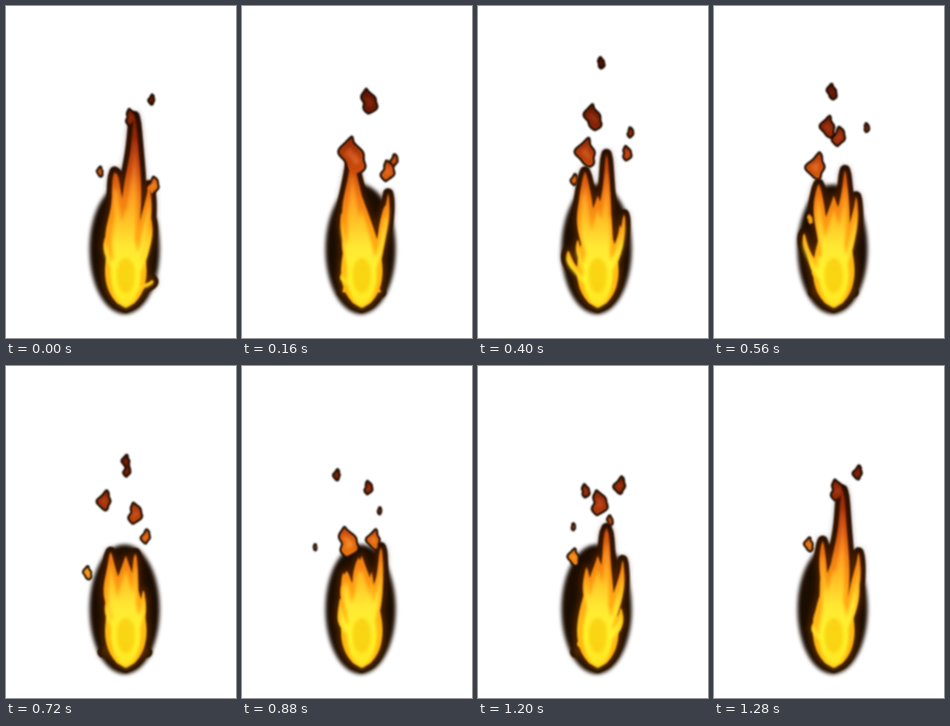
Recreate the animation shown at these times as an HTML page with a canvas. Size 288 by 415 pixels, loop 1360 ms.

```html
<!DOCTYPE html>
<html lang="en">
<head>
<meta charset="utf-8">
<title>Flame</title>
<style>
  html, body { margin: 0; width: 100%; height: 100%; overflow: hidden; background: #fff; }
  canvas { display: block; width: 288px; height: 415px; }
</style>
</head>
<body>
<canvas id="stage" width="288" height="415"></canvas>
<script>
const ctx = document.getElementById('stage').getContext('2d');
const LOOP = 1360, STEP = 80;
const GROW = 320, FALL = 160;   // ms a tongue takes to rise and to sink back
const RISE = 0.2;               // px per ms a shed wisp climbs
const ROOT = { x: 150, y: 358 };
const DARK = '#1b0d02';

// A tongue licks up to its tip at its peak, then sheds a wisp that drifts sideways.
const tongues = [
  [0, 161, 138, 26, -8],
  [0, 136, 207, 17, -4],
  [80, 179, 213, 18, 14],
  [120, 138, 178, 34, 12],
  [160, 125, 258, 14, -6],
  [300, 183, 198, 12, 10],
  [340, 134, 182, 26, 20],
  [400, 161, 185, 20, -12],
  [400, 125, 292, 12, -10],
  [500, 131, 200, 24, -14],
  [560, 164, 205, 22, -8],
  [560, 113, 284, 13, -22],
  [560, 178, 238, 14, -6],
  [800, 131, 222, 28, 4],
  [800, 162, 224, 18, 18],
  [880, 127, 258, 14, -8],
  [880, 172, 248, 18, -8],
  [1040, 174, 172, 18, 10],
  [1040, 146, 190, 26, 14],
  [1040, 123, 262, 18, -6],
  [1280, 181, 233, 15, 14],
].map(([peak, x, top, width, drift], i) => ({ peak, x, top, width, drift, phase: i * 2.4 }));

const taper = s => 0.6 * (1 - s) ** 0.6;
const leaf = s => 0.5 * Math.sin(Math.PI * s ** 0.8);
const bulb = s => 0.5 * Math.sin(Math.PI * s ** 0.62);

// Adds a closed band whose spine and half width are functions of s from 0 to 1.
function addRibbon(path, spine, half) {
  const steps = 24, left = [], right = [];
  for (let i = 0; i <= steps; i++) {
    const s = i / steps, [x, y] = spine(s), h = half(s);
    left.push([x - h, y]);
    right.unshift([x + h, y]);
  }
  [...left, ...right].forEach((p, i) => i ? path.lineTo(...p) : path.moveTo(...p));
  path.closePath();
}

function addTongue(path, tongue, age, t, slim, reach) {
  if (age >= FALL) return;
  const grown = age < 0 ? Math.sin(Math.PI / 2 * (1 + age / GROW)) : 1 - (age / FALL) ** 2;
  const height = (ROOT.y - tongue.top) * grown * reach;
  const wave = s => Math.sin(s * 9 - t / LOOP * 4 * Math.PI + tongue.phase);
  addRibbon(path,
    s => [ROOT.x + (tongue.x - ROOT.x) * Math.sin(Math.PI / 2 * s) + 3 * wave(s) * s * (1 - s),
      ROOT.y - height * s],
    s => tongue.width * slim * taper(s) * (1 + 0.22 * wave(s + 0.3)));
}

function addWisp(path, tongue, age, slim) {
  const life = 200 + tongue.width * 10;
  if (age <= 0 || age >= life) return;
  const k = age / life;
  const width = tongue.width * 0.85 * (1 - k) ** 0.7;
  const height = (width * 1.5 + 4) * slim;
  const x = tongue.x + tongue.drift * k;
  const y = tongue.top + tongue.width / 2 - RISE * age;
  addRibbon(path,
    s => [x + width * 0.16 * Math.sin(s * 5 + tongue.phase), y + height * (0.5 - s)],
    s => width * slim * leaf(s) * (1 + 0.2 * Math.sin(s * 11 + tongue.phase)));
}

// Shapes at time t; slim and reach shrink them for the bright inside.
function shapes(t, slim = 1, reach = 1) {
  const body = new Path2D(), wisps = new Path2D();
  addRibbon(body, s => [150, 377 - 140 * s * reach], s => 52 * slim ** 0.5 * bulb(s));
  for (const tongue of tongues) {
    const age = (t - tongue.peak + GROW + LOOP) % LOOP - GROW;
    addTongue(body, tongue, age, t, slim, reach);
    addWisp(wisps, tongue, age, slim);
  }
  return { body, wisps };
}

function vertical(...stops) {
  const top = 80, bottom = 380;
  const gradient = ctx.createLinearGradient(0, top, 0, bottom);
  for (const [y, color] of stops) gradient.addColorStop((y - top) / (bottom - top), color);
  return gradient;
}

const fire = vertical([80, '#4c0e00'], [130, '#6c1802'], [170, '#9c2c06'], [205, '#cc4c0c'],
  [240, '#f07c10'], [280, '#ffa012'], [330, '#ffbc12'], [380, '#ffa808']);
const light = vertical([100, 'rgba(150,50,20,.4)'], [180, 'rgba(220,95,45,.6)'], [235, '#ff9c24'],
  [270, '#ffc426'], [300, '#ffe834'], [340, '#fff62c'], [380, '#ffe020']);
const warmth = vertical([80, '#2a0800'], [200, '#4c1a00'], [380, '#663400']);

function soften(px) {
  ctx.filter = `blur(${px}px)`;
}

function fill(path, style) {
  ctx.fillStyle = style;
  ctx.fill(path);
}

function stroke(path, style, width) {
  ctx.strokeStyle = style;
  ctx.lineWidth = width;
  ctx.stroke(path);
}

function ellipse(x, y, rx, ry) {
  const path = new Path2D();
  path.ellipse(x, y, rx, ry, 0, 0, Math.PI * 2);
  return path;
}

function draw(t) {
  const outer = shapes(t), inner = shapes(t, 0.5, 0.88);

  ctx.filter = 'none';
  ctx.fillStyle = '#fff';
  ctx.fillRect(0, 0, 288, 415);
  ctx.lineJoin = 'round';

  soften(2.5);
  fill(ellipse(148.5, 304, 44, 81), DARK);
  soften(1);
  stroke(outer.body, DARK, 13);
  stroke(outer.wisps, DARK, 5);

  soften(4);
  stroke(outer.body, warmth, 7);
  soften(1.2);
  fill(outer.body, fire);
  fill(outer.wisps, fire);

  soften(2);
  fill(inner.body, light);
  fill(inner.wisps, light);
  fill(ellipse(150, 337, 12, 22), 'rgba(248,200,10,.7)');
}

function tick(now) {
  draw(Math.floor(now / STEP) * STEP % LOOP);
  requestAnimationFrame(tick);
}
draw(0);
requestAnimationFrame(tick);
</script>
</body>
</html>
```
